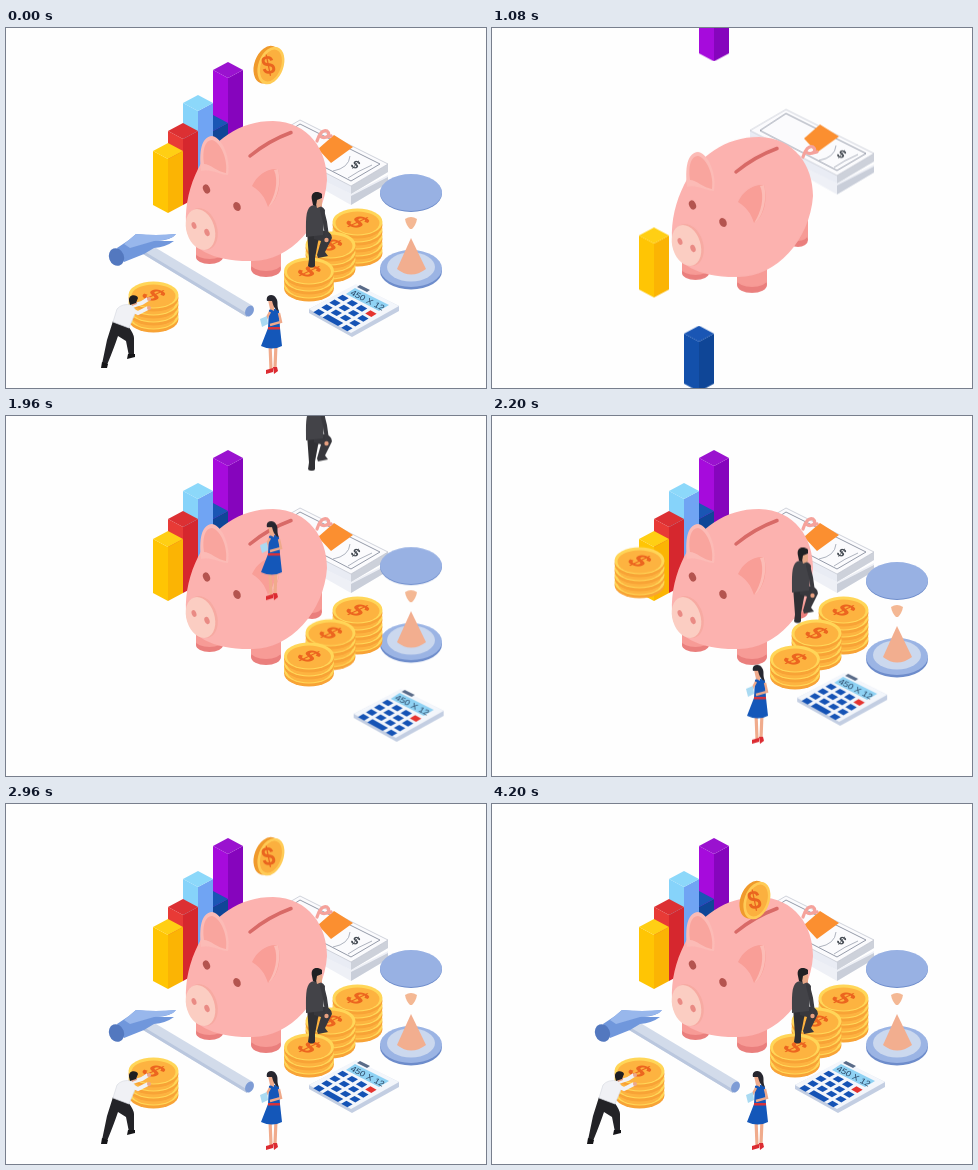
These frames come from a looping animation (480 by 360 pixels, 4.68 s). An HTML page:

```html
<!DOCTYPE html>
<html lang="en">
<head>
<meta charset="utf-8">
<title>Savings</title>
<style>
  html, body { margin: 0; width: 100%; height: 100%; overflow: hidden; background: #fefefe; }
  svg { display: block; width: 480px; height: 360px; }
  text { font-family: "Liberation Sans", Arial, sans-serif; font-weight: 700; text-anchor: middle; }
  .thin { font-weight: 400; }
</style>
</head>
<body>
<svg viewBox="0 0 480 360">
  <g id="bars"></g>

  <g id="money">
    <path d="M262 120L345 166 382 147V155L345 177 262 130Z" fill="#eef0f6"/>
    <path d="M345 168L382 149V155L345 177Z" fill="#c9ced9"/>
    <path d="M258 113L345 158 382 136V144L345 166 258 122Z" fill="#e9ecf4"/>
    <path d="M345 158L382 136V144L345 166Z" fill="#cdd1da"/>
    <path d="M294 92L382 136 345 158 258 113Z" fill="#fbfbfd" stroke="#bcc1cc" stroke-width=".7"/>
    <path d="M294 96L374 136 345 153 268 113Z" fill="none" stroke="#8a90a0" stroke-width=".9"/>
    <path d="M327 143Q343 140 344 128M342 150Q352 143 366 137" fill="none" stroke="#9aa0ae" stroke-width=".8"/>
    <text transform="matrix(.9 .4 -.6 .75 347 140)" font-size="13" fill="#444a52">$</text>
    <path d="M312 121L328 107 347 119 325 135Z" fill="#fb8f30"/>
  </g>

  <g id="pig">
    <g fill="#f79b96">
      <path d="M190 212H217V229H190ZM245 215H275V241H245ZM296 170H316V196H296Z"/>
    </g>
    <g fill="#ea7f7d">
      <ellipse cx="203.500" cy="229" rx="13.500" ry="7"/>
      <ellipse cx="260" cy="241" rx="15" ry="8"/>
      <ellipse cx="306" cy="196" rx="10" ry="7"/>
    </g>
    <g fill="#f79b96">
      <ellipse cx="203.500" cy="225" rx="13.500" ry="6"/>
      <ellipse cx="260" cy="236" rx="15" ry="7"/>
      <ellipse cx="306" cy="191" rx="10" ry="6"/>
    </g>
    <path d="M311 113C313 106 317 101 321 103C326 107 319 112 314 108M321 109L325 108" fill="none" stroke="#f5a29b" stroke-width="3.200" stroke-linecap="round"/>
    <path d="M180 196C179 176 184 157 192 141C207 112 233 93 267 93C303 94 321 122 321 152C318 196 284 233 247 233C210 234 181 222 180 196Z" fill="#fcb2af"/>
    <path d="M195 143C193 124 195 109 206 108C217 110 225 131 222 147C212 146 203 140 195 143Z" fill="#fcbbb6"/>
    <path d="M198 136C196 122 199 112 206 112C215 114 222 132 220 145C212 144 204 136 198 136Z" fill="#f9a59e"/>
    <path d="M246 158C251 147 261 140 272 141C276 156 272 173 262 179C259 169 254 163 246 158Z" fill="#f99e97"/>
    <path d="M268 142C273 153 269 169 262 179C270 175 276 157 272 141Z" fill="#fcbcb6"/>
    <path d="M244 128Q262 113 285 104.500" fill="none" stroke="#d86a67" stroke-width="3.500" stroke-linecap="round"/>
    <ellipse cx="200.500" cy="161" rx="3.300" ry="4.800" transform="rotate(-25 200.500 161)" fill="#b4544f"/>
    <ellipse cx="231" cy="178.500" rx="3.500" ry="4.800" transform="rotate(-25 231 178.500)" fill="#b4544f"/>
    <ellipse cx="196.500" cy="201" rx="14.500" ry="21.500" transform="rotate(-18 196.500 201)" fill="#f7aaa2"/>
    <ellipse cx="194.500" cy="201.500" rx="14" ry="21" transform="rotate(-18 194.500 201.500)" fill="#fbcdc2"/>
    <ellipse cx="188" cy="197.500" rx="2.300" ry="3.500" transform="rotate(-20 188 197.500)" fill="#e98a84"/>
    <ellipse cx="201" cy="204.500" rx="2.500" ry="3.700" transform="rotate(-20 201 204.500)" fill="#e98a84"/>
  </g>

  <g id="glass">
    <ellipse cx="405" cy="243" rx="31" ry="18.500" fill="#6d8ccb"/>
    <ellipse cx="405" cy="240.500" rx="31" ry="18.500" fill="#9bb4e4"/>
    <ellipse cx="405" cy="239" rx="24" ry="14.500" fill="#cbd8ee"/>
    <path d="M405 210L391 241Q405 252 420 241Z" fill="#f2ae8f"/>
    <path d="M399 191Q405 187 411 191Q410 197 406 201H404Q400 197 399 191Z" fill="#f4b894"/>
    <ellipse cx="405" cy="165.500" rx="31" ry="18.500" fill="#6d8ccb"/>
    <ellipse cx="405" cy="164.500" rx="31" ry="18.500" fill="#98b1e3"/>
  </g>

  <g id="tall"></g>
  <g id="mid"></g>
  <g id="low"></g>

  <g id="man">
    <path d="M301 203L303 231 302 238Q306 241 309 238L309 230 312 214 315 205Z" fill="#303034"/>
    <path d="M308 202L321 203Q328 207 325 212L319 224 322 228 312 230 311 227 315 213 308 211Z" fill="#38383d"/>
    <path d="M305 178C299 182 300 194 300 209L317 207 319 182C316 177 309 176 305 178Z" fill="#434348"/>
    <path d="M316 182L319 194 321 208" fill="none" stroke="#3a3a3f" stroke-width="4" stroke-linecap="round"/>
    <circle cx="320.500" cy="212" r="2.200" fill="#e8a080"/>
    <path d="M309 171H316V178L311 180Z" fill="#e8a888"/>
    <path d="M306 172C304 164 311 162 316 166L316 170 311 172 310 178 307 177Z" fill="#202023"/>
  </g>

  <g id="calc">
    <path d="M303 281L350 257 393 278V283L346 309 303 285Z" fill="#c3cee2"/>
    <path d="M303 281L350 256 393 278 345 305Z" fill="#f3f6fb"/>
    <path d="M340 266L349 260 383 277 373 283Z" fill="#8fd2f4"/>
    <path d="M354 257L364 262 361 264 351 259Z" fill="#596b88"/>
    <text class="thin" transform="matrix(.9 .46 -.5 .75 360 274.500)" font-size="9" fill="#27405f">450 X 12</text>
    <g id="keys" transform="matrix(9.3 5.2 -8 4.8 337 270)" fill="#1553b5"></g>
  </g>

  <g id="woman">
    <path d="M264 316L265 341M270 316L269 340" stroke="#f0ab8c" stroke-width="3.200"/>
    <path d="M260 342L267 340V344L260 346ZM267 339H271L272 343 268 346Z" fill="#dc2b31"/>
    <path d="M263 282Q268 279 273 283L274 300 276 318Q266 323 255 318L262 300Z" fill="#1457b9"/>
    <path d="M262 299H274V301.500H262Z" fill="#d6323a"/>
    <path d="M273 285L275 294 264 297M264 284L259 293" fill="none" stroke="#efa98a" stroke-width="2.400"/>
    <path d="M254 291L261 288 262 296 256 299Z" fill="#a9daf2"/>
    <path d="M262 272H268V283L264 281Z" fill="#f0ab8c"/>
    <path d="M261 273C259 266 268 265 270 270C273 274 270 277 273 283C268 282 267 276 266 273Z" fill="#26262f"/>
  </g>

  <g id="pile"></g>

  <g id="pusher">
    <path d="M107 293L122 298Q128 306 128 310L128 327 123 328 120 313 112 308Q108 320 101 337L96 336 101 312Z" fill="#232327"/>
    <path d="M96 334L102 336 101 340H95ZM122 326H129V329L121 331Z" fill="#151518"/>
    <path d="M111 281Q116 275 126 277L130 283 123 300 107 294Z" fill="#f0f1f5" stroke="#d9dbe2" stroke-width=".7"/>
    <path d="M121 280L132 285 142 280M126 278L136 275 142 271" fill="none" stroke="#f0f1f5" stroke-width="4"/>
    <circle cx="143" cy="280" r="2" fill="#eca789"/>
    <circle cx="143" cy="271" r="2" fill="#eca789"/>
    <path d="M124 270H131V276L126 278Z" fill="#e9a587"/>
    <path d="M123 273C122 266 131 266 132 270L130 275 124 277Z" fill="#1e1e22"/>
  </g>

  <g id="hammer">
    <path d="M137 226L145 217 247 278 241 289Z" fill="#d2dbea"/>
    <path d="M137 226L138.500 223.500 242 286 241 289Z" fill="#bac7de"/>
    <ellipse cx="243.500" cy="283" rx="4" ry="5.800" transform="rotate(28 243.500 283)" fill="#7e9cd5"/>
    <path d="M111 220L123 212 130 206Q150 208 170 206Q166 212 150 213L168 213Q160 219 148 220L138 226 118 234Z" fill="#7097dc"/>
    <path d="M130 206Q150 208 170 206Q166 212 148 213L124 220 118 216Z" fill="#98b7ec"/>
    <ellipse cx="110.500" cy="229" rx="7.500" ry="9" transform="rotate(-20 110.500 229)" fill="#5378bf"/>
  </g>

  <g id="coin">
    <g transform="rotate(20 263.500 96)">
      <ellipse cx="261" cy="96.500" rx="12.500" ry="19.500" fill="#f09a2c"/>
      <ellipse cx="265" cy="96" rx="12.500" ry="19.500" fill="#ffcb56"/>
      <ellipse cx="265" cy="96" rx="10" ry="16.500" fill="#fbb03f"/>
    </g>
    <text transform="matrix(.9 -.12 .2 1 264 105)" font-size="26" fill="#ea651f">$</text>
  </g>
</svg>
<script>
  const LOOP = 4680;
  const OUT = 'cubic-bezier(.3333,1,.6667,1)';
  const SOFT = 'cubic-bezier(.3333,.6667,.6667,1)';
  const $ = id => document.getElementById(id);

  // Isometric column: apex of the top face, height, three shades
  function bar(id, x, y, h, [top, left, right]) {
    $('bars').insertAdjacentHTML('beforeend', `<g id="${id}">
      <path d="M${x - 15} ${y + 8}l15 8v${h}l-15 -8Z" fill="${left}"/>
      <path d="M${x + 15} ${y + 8}l-15 8v${h}l15 -8Z" fill="${right}"/>
      <path d="M${x} ${y}l15 8 -15 8 -15 -8Z" fill="${top}"/></g>`);
  }

  // Pile of flat coins: centre of the top face, coins below it
  function stack(id, x, y, extra) {
    let s = '';
    for (let i = extra; i >= 0; i--) {
      const cy = y + i * 7;
      s += `<ellipse cx="${x}" cy="${cy + 2}" rx="25" ry="13.5" fill="#f8a336"/>
        <ellipse cx="${x}" cy="${cy - 1}" rx="25" ry="13.5" fill="#ffd658"/>
        <ellipse cx="${x}" cy="${cy}" rx="22" ry="11.5" fill="#fdb340"/>`;
    }
    $(id).innerHTML = s +
      `<text transform="matrix(.8 .4 -.85 .4 ${x - 8} ${y + 3})" font-size="29" fill="#ec651f">$</text>`;
  }

  bar('purple', 222, 34, 80, ['#9a12cf', '#a60bdc', '#8605bd']);
  bar('blue', 207, 87, 50, ['#1a56b4', '#1350ab', '#0f4697']);
  bar('sky', 192, 67, 75, ['#8cd8fa', '#86d3fa', '#70a4f3']);
  bar('red', 177, 95, 66, ['#dc3033', '#e83a36', '#d6272e']);
  bar('yellow', 162, 115, 54, ['#ffcf14', '#ffc504', '#fbb404']);
  stack('tall', 351.500, 195, 4);
  stack('mid', 324.500, 218, 3);
  stack('low', 303, 244, 2);
  stack('pile', 147.500, 268, 3);

  // Keypad: red corner key, double key in the last row
  for (let r = 0; r < 4; r++)
    for (let c = 0; c < 4; c++) {
      if (r === 3 && c === 2) continue;
      const w = r === 3 && c === 1 ? 1.66 : .66;
      const red = r === 0 && c === 3 ? ' fill="#e5332f"' : '';
      $('keys').insertAdjacentHTML('beforeend',
        `<rect x="${c - .33}" y="${r - .33}" width="${w}" height=".66"${red}/>`);
    }

  // Rest at the loop start, jump away, then follow stops of [ms, x, y, easing]
  function move(id, stops, rest = [0, 0], away = stops[0].slice(1, 3)) {
    const at = (t, x, y, easing = 'linear') =>
      ({ offset: t / LOOP, transform: `translate(${x}px,${y}px)`, easing });
    const [, x, y] = stops[stops.length - 1];
    $(id).animate([
      at(0, ...rest, 'steps(1,end)'),
      at(40, ...away, 'steps(1,end)'),
      ...stops.map(s => at(...s)),
      at(LOOP, x, y)
    ], { duration: LOOP, iterations: Infinity });
  }
  const enter = (id, t, x, y) => move(id, [[t, x, y, OUT], [t + 600, 0, 0]]);

  enter('pig', 715, 0, 268);
  enter('money', 715, 0, -178);
  enter('yellow', 900, 0, 248);
  enter('purple', 960, 0, -190);
  enter('blue', 1030, 0, 275);
  enter('sky', 1085, 0, -190);
  enter('red', 1125, 0, 268);
  enter('tall', 1320, 0, -245);
  enter('mid', 1424, 0, -260);
  enter('low', 1493, 0, -285);
  enter('glass', 1589, 0, -270);
  enter('calc', 1738, 180, 68);
  enter('woman', 1825, 0, -350);
  enter('man', 1907, 0, -245);
  enter('pile', 2042, 0, -308);
  move('pusher', [[2240, -160, 72], [2360, -74, 33], [2480, 19, -8, SOFT], [2720, 0, 0]]);
  move('hammer', [[2260, 390, 124], [2360, 232, 74], [2480, 47, 15, OUT], [2720, 0, 0]]);
  move('coin', [[2780, 0, -59, SOFT], [4080, 0, 0]], [0, -59], [0, -150]);
</script>
</body>
</html>
```
